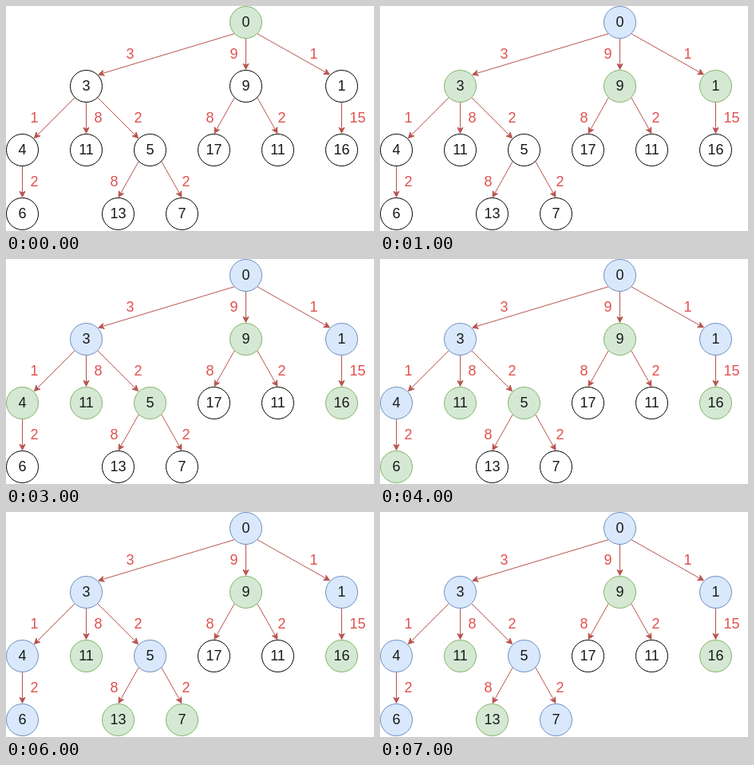
Write an HTML page that moves like this. It is 461 px wide and 282 px high and loops after 8000 ms.

```html
<!DOCTYPE html>
<html lang="en">
<head>
<meta charset="utf-8">
<title>Uniform-cost search</title>
<style>
  html, body { margin: 0; width: 100%; height: 100%; overflow: hidden; background: #fff; }
  svg { display: block; }
  text { font: 18px "Liberation Sans", Arial, sans-serif; text-anchor: middle; fill: #1a1a1a; }
  .cost { fill: #e25050; }
  .edge { fill: none; stroke: #b85450; }
  .head { fill: #b85450; stroke: #b85450; stroke-miterlimit: 10; }
  .hidden { fill: #fff; stroke: #000; }
  .frontier { fill: #d5e8d4; stroke: #82b366; }
  .visited { fill: #dae8fc; stroke: #6c8ebf; }
</style>
</head>
<body>
<svg width="461" height="282"></svg>
<script>
const STEP = 1000, STEPS = 8, RADIUS = 20, CORNER = RADIUS * Math.SQRT1_2;
const svg = document.querySelector('svg');

// id: [label, x, y]
const nodes = {
  root: [0, 300, 20],
  a: [3, 100, 100], b: [9, 300, 100], c: [1, 420, 100],
  d: [4, 20, 180], e: [11, 100, 180], f: [5, 180, 180],
  g: [17, 260, 180], h: [11, 340, 180], i: [16, 420, 180],
  j: [6, 20, 260], k: [13, 140, 260], l: [7, 220, 260]
};
// parent, child, cost, label x, whether the arrow meets the child diagonally
const edges = [
  ['root', 'a', 3, 155, true], ['root', 'b', 9, 285], ['root', 'c', 1, 385, true],
  ['a', 'd', 1, 35, true], ['a', 'e', 8, 115], ['a', 'f', 2, 165, true],
  ['b', 'g', 8, 255], ['b', 'h', 2, 345], ['c', 'i', 15, 440],
  ['d', 'j', 2, 35], ['f', 'k', 8, 135], ['f', 'l', 2, 225]
];
const visitOrder = ['root', 'c', 'a', 'd', 'f', 'j', 'l'];

function add(tag, attributes, content = '') {
  const element = document.createElementNS('http://www.w3.org/2000/svg', tag);
  for (const name in attributes) element.setAttribute(name, attributes[name]);
  element.textContent = content;
  return svg.appendChild(element);
}

function arrow(x1, y1, x2, y2) {
  const length = Math.hypot(x2 - x1, y2 - y1);
  const ux = (x2 - x1) / length, uy = (y2 - y1) / length;
  const point = (back, side) =>
    `${x2 - ux * back - uy * side} ${y2 - uy * back + ux * side}`;
  add('path', { class: 'edge', d: `M${x1} ${y1}L${point(6.37, 0)}` });
  add('path', {
    class: 'head',
    d: `M${point(1.12, 0)}L${point(8.12, 3.5)}L${point(6.37, 0)}L${point(8.12, -3.5)}Z`
  });
}

for (const [parent, child, cost, labelX, diagonal] of edges) {
  const [, x1, y1] = nodes[parent], [, x2, y2] = nodes[child];
  const side = Math.sign(x2 - x1);
  const startY = side ? CORNER : RADIUS, endY = diagonal ? CORNER : RADIUS;
  arrow(x1 + side * CORNER + 0.5, y1 + startY + 0.5,
        x2 - (diagonal ? side * CORNER : 0) + 0.5, y2 - endY + 0.5);
  add('text', { class: 'cost', x: labelX + 0.5, y: (y1 + y2) / 2 + 6 }, cost);
}

const circles = {};
for (const id in nodes) {
  const [label, x, y] = nodes[id];
  circles[id] = add('circle', { cx: x + 0.5, cy: y + 0.5, r: RADIUS });
  add('text', { x: x + 0.5, y: y + 6 }, label);
}

function draw(time) {
  const visited = visitOrder.slice(0, Math.floor(time / STEP) % STEPS);
  for (const id in circles) {
    const parent = edges.find(edge => edge[1] === id)?.[0];
    const state = visited.includes(id) ? 'visited'
      : !parent || visited.includes(parent) ? 'frontier' : 'hidden';
    circles[id].setAttribute('class', state);
  }
}

let start;
function tick(now) {
  start ??= now;
  draw(now - start);
  requestAnimationFrame(tick);
}
draw(0);
requestAnimationFrame(tick);
</script>
</body>
</html>
```
